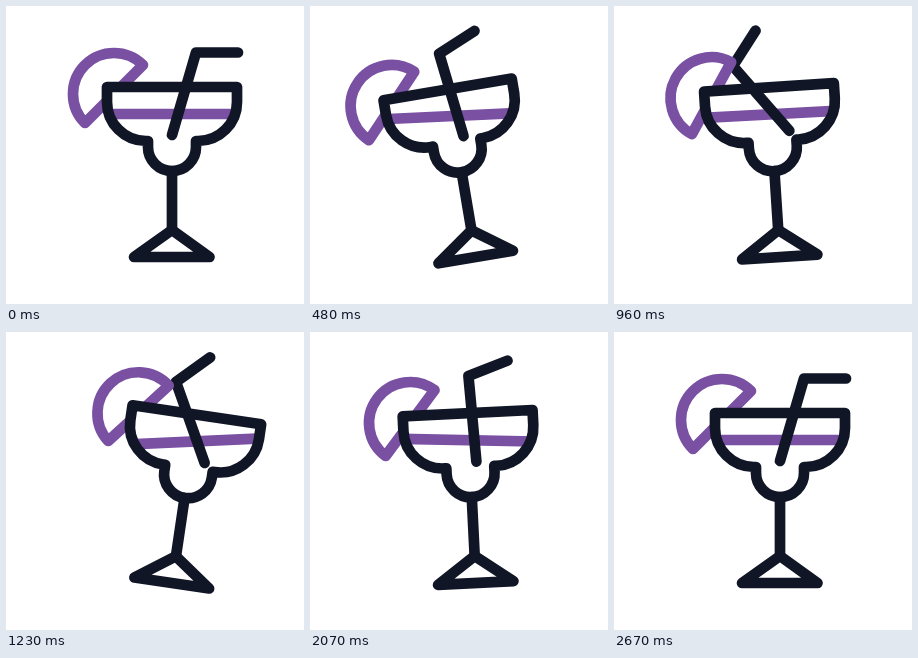
An HTML page with a canvas for the animation above (3.6 s loop, 298x298 px).

```html
<!DOCTYPE html>
<html lang="en">
<head>
<meta charset="utf-8">
<title>Rocking cocktail</title>
<style>
  html, body { margin: 0; width: 100%; height: 100%; overflow: hidden; background: #fff; }
  canvas { display: block; width: 100%; height: 100%; }
</style>
</head>
<body>
<canvas id="stage"></canvas>
<script>
const SIZE = 298, LOOP = 3600, STEP = 30, END = 2670;
const DARK = '#111626', PURPLE = '#7a50a3';
const canvas = document.getElementById('stage');
const ctx = canvas.getContext('2d');
const scale = window.devicePixelRatio || 1;
canvas.width = canvas.height = Math.round(SIZE * scale);

// Keys are [time in ms, angle in degrees], eased by a half cosine between them.
const SWAY = [[0, 0], [705, -12.5], [1280, 8.8], [1855, -4.8], [2340, 0]];
const SLOSH = [[0, 0], [705, 9], [1280, -11.4], [1855, 6.8], [2340, 0]];
const SLICE = [[300, 0], [1020, -12.9], [1580, 10], [2130, -6], [END, 0]];
const STRAW = [[0, 0], [1070, -55], [1610, -0.8], [2110, -19], [END, 0]];

function angleAt(keys, t) {
  if (t <= keys[0][0]) return 0;
  for (let i = 1; i < keys.length; i++) {
    const [t0, a0] = keys[i - 1], [t1, a1] = keys[i];
    if (t < t1) return a0 + (a1 - a0) * (1 - Math.cos(Math.PI * (t - t0) / (t1 - t0))) / 2;
  }
  return 0;
}

function line(...points) {
  const path = new Path2D();
  points.forEach(([x, y]) => path.lineTo(x, y));
  return path;
}

const bowl = new Path2D();
bowl.moveTo(101, 81);
bowl.lineTo(231, 81);
bowl.lineTo(231, 96);
bowl.arc(192, 96, 39, 0, Math.PI / 2);
bowl.lineTo(190, 135);
bowl.arc(166, 141, 24, 0, Math.PI);
bowl.lineTo(142, 135);
bowl.arc(140, 96, 39, Math.PI / 2, Math.PI);
bowl.closePath();

const outside = new Path2D();
outside.rect(-SIZE, -SIZE, 3 * SIZE, 3 * SIZE);
outside.addPath(bowl);

const stem = line([166, 165], [166, 224]);
const base = line([166, 224], [203.5, 251], [128, 251]);
base.closePath();
const straw = line([232, 46.5], [190, 46.5], [166, 129]);
const liquid = line([60, 108], [272, 108]);
const slice = new Path2D();
slice.arc(108, 88, 41, Math.PI * 0.75, Math.PI * 1.75);
slice.closePath();

function turn(x, y, degrees) {
  ctx.translate(x, y);
  ctx.rotate(degrees * Math.PI / 180);
  ctx.translate(-x, -y);
}

function strokePart(path, color, x, y, degrees, clip) {
  ctx.save();
  if (clip) ctx.clip(clip, 'evenodd');
  turn(x, y, degrees);
  ctx.strokeStyle = color;
  ctx.stroke(path);
  ctx.restore();
}

function draw(t) {
  ctx.setTransform(scale, 0, 0, scale, 0, 0);
  ctx.fillStyle = '#fff';
  ctx.fillRect(0, 0, SIZE, SIZE);
  ctx.lineWidth = 10.7;
  ctx.lineCap = ctx.lineJoin = 'round';
  turn(166, 251, angleAt(SWAY, t));
  strokePart(liquid, PURPLE, 166, 108, angleAt(SLOSH, t), bowl);
  strokePart(straw, DARK, 171.5, 110, angleAt(STRAW, t));
  strokePart(slice, PURPLE, 108, 88, angleAt(SLICE, t), outside);
  ctx.strokeStyle = DARK;
  [bowl, stem, base].forEach(path => ctx.stroke(path));
}

const start = performance.now();
function tick() {
  const t = (performance.now() - start) % LOOP;
  draw(Math.min(END, Math.floor(t / STEP) * STEP));
  requestAnimationFrame(tick);
}
tick();
</script>
</body>
</html>
```
